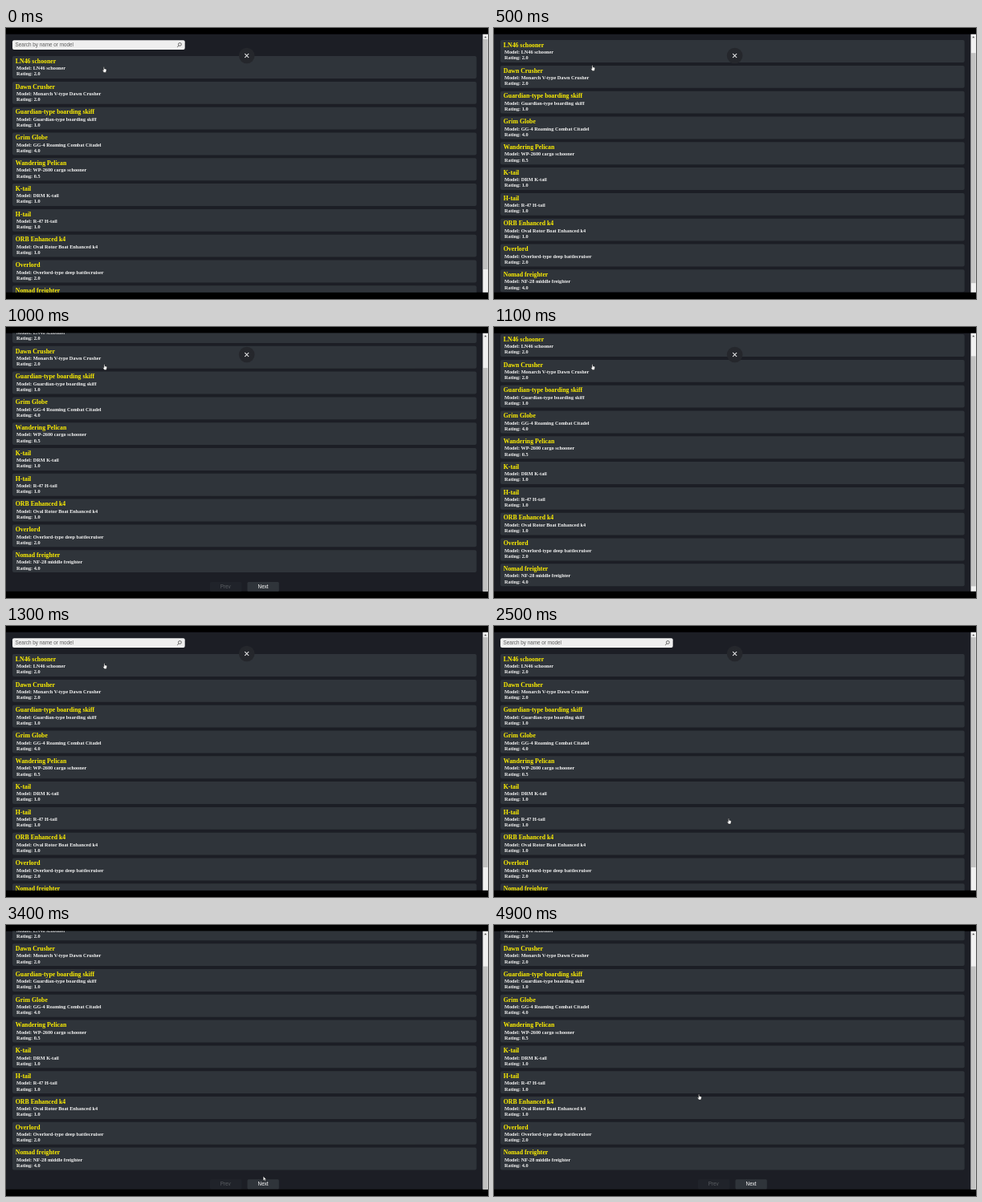
Recreate the animation shown at these times as an HTML page. Size 600x338 px, loop 5000 ms.

```html
<!DOCTYPE html>
<html lang="en">
<head>
<meta charset="utf-8">
<title>Ship list</title>
<style>
  html, body { margin: 0; width: 100%; height: 100%; overflow: hidden; background: #000; }
  svg { display: block; width: 100vw; height: 100vh; }
  .name { font: bold 7.8px "Liberation Serif", serif; fill: #fff000; }
  .info { font: bold 6.26px "Liberation Serif", serif; fill: #f4f4f4; }
  .ui { font: 6.33px "Liberation Sans", sans-serif; }
</style>
</head>
<body>
<svg viewBox="0 0 600 338">
  <defs><clipPath id="view"><rect y="7.5" width="600" height="322.2"/></clipPath></defs>
  <rect width="600" height="338"/>
  <g clip-path="url(#view)">
    <rect y="7.5" width="600" height="323" fill="#1c1e25"/>
    <g id="page">
      <rect x="8" y="15.3" width="214.7" height="11.8" rx="2" fill="#efefef"/>
      <text class="ui" x="11.5" y="23.4" fill="#5c5c5c">Search by name or model</text>
      <g fill="none" stroke="#444" stroke-width=".8">
        <circle cx="216.4" cy="20.4" r="1.9"/>
        <path d="M215 21.9L213.2 23.8"/>
      </g>
      <g id="cards"></g>
      <rect x="254" y="361" width="39.3" height="12.2" rx="1.5" fill="#20232a"/>
      <rect x="300.5" y="361" width="39.3" height="12.2" rx="1.5" fill="#2f343a"/>
      <g class="ui" text-anchor="middle">
        <text x="273.2" y="369.2" fill="#5b5e63">Prev</text>
        <text x="320.1" y="369.2" fill="#fff">Next</text>
      </g>
    </g>
    <rect x="593.5" y="7.5" width="6.5" height="323" fill="#f1f1f1"/>
    <path d="M595.2 12.2l1.6-1.9 1.6 1.9z" fill="#505050"/>
    <rect id="thumb" x="594" y="14" width="5.6" height="287" fill="#c1c1c1"/>
    <g id="close">
      <circle cx="299.7" cy="34.5" r="9.8" fill="#25272c"/>
      <path d="M297.2 32l5 5m0-5l-5 5" stroke="#fff" stroke-width="1.05"/>
    </g>
    <path id="hand" fill="#fff" stroke="#111" stroke-width=".45" stroke-linejoin="round"
      d="M1.7 .7Q2.3 -.1 2.8 .7V2.7L4.9 3.2Q5.6 3.4 5.5 4.3L5.1 6.2 4.7 7.3H2.2L.5 4.9Q.2 4.1 .9 4.2L1.7 4.8z"/>
    <path id="arrow" fill="#fff" stroke="#111" stroke-width=".4"
      d="M0 0V5.4L1.3 4.3 2.1 6.2 3 5.8 2.2 4H3.9z"/>
  </g>
</svg>
<script>
const $ = id => document.getElementById(id);

const ships = [
  ["LN46 schooner", "LN46 schooner", "2.0"],
  ["Dawn Crusher", "Monarch V-type Dawn Crusher", "2.0"],
  ["Guardian-type boarding skiff", "Guardian-type boarding skiff", "1.0"],
  ["Grim Globe", "GG-4 Roaming Combat Citadel", "4.0"],
  ["Wandering Pelican", "WP-2600 cargo schooner", "0.5"],
  ["K-tail", "DRM K-tail", "1.0"],
  ["H-tail", "R-47 H-tail", "1.0"],
  ["ORB Enhanced k4", "Oval Rotor Boat Enhanced k4", "1.0"],
  ["Overlord", "Overlord-type deep battlecruiser", "2.0"],
  ["Nomad freighter", "NF-28 middle freighter", "4.0"]
];

$("cards").innerHTML = ships.map(([name, model, rating], i) => `
  <g transform="translate(0 ${35.1 + i * 31.8})">
    <rect x="8" width="577.7" height="27.9" rx="2" fill="#2f343a"/>
    <text class="name" x="11.8" y="8.8">${name}</text>
    <text class="info" x="13" y="17.2">Model: ${model}</text>
    <text class="info" x="13" y="24.4">Rating: ${rating}</text>
  </g>`).join("");

const LOOP = 5000, END = 43.7;

// [time, scroll offset]
const scrolls = [
  [0, 0], [500, 20], [600, 40.2], [700, 43.2], [800, END],
  [1000, 43.1], [1100, 26], [1200, 5], [1300, 0],
  [3300, 27], [3400, END]
];

// [time, x, y, shape]
const moves = [
  [0, 119.6, 48.1, "hand"], [100, 120.2, 46.1, "hand"],
  [2500, 289.8, 239.6, "hand"], [2800, 314.2, 282.4, "hand"],
  [3300, 320.2, 313.4, "arrow"], [4900, 252.8, 210.7, "hand"]
];

const at = (keys, t) => keys.filter(k => k[0] <= t).pop();
const show = (el, on) => el.setAttribute("visibility", on ? "visible" : "hidden");
const shift = (el, x, y) => el.setAttribute("transform", `translate(${x} ${y})`);

function draw(t) {
  const scroll = at(scrolls, t)[1];
  const [, x, y, shape] = at(moves, t);
  shift($("page"), 0, -scroll);
  shift($("thumb"), 0, scroll * 0.86);
  show($("close"), t < 3300);
  for (const id of ["hand", "arrow"]) {
    show($(id), id === shape);
    shift($(id), x, y);
  }
}

const start = performance.now();
function tick() {
  draw((performance.now() - start) % LOOP);
  requestAnimationFrame(tick);
}
tick();
</script>
</body>
</html>
```
